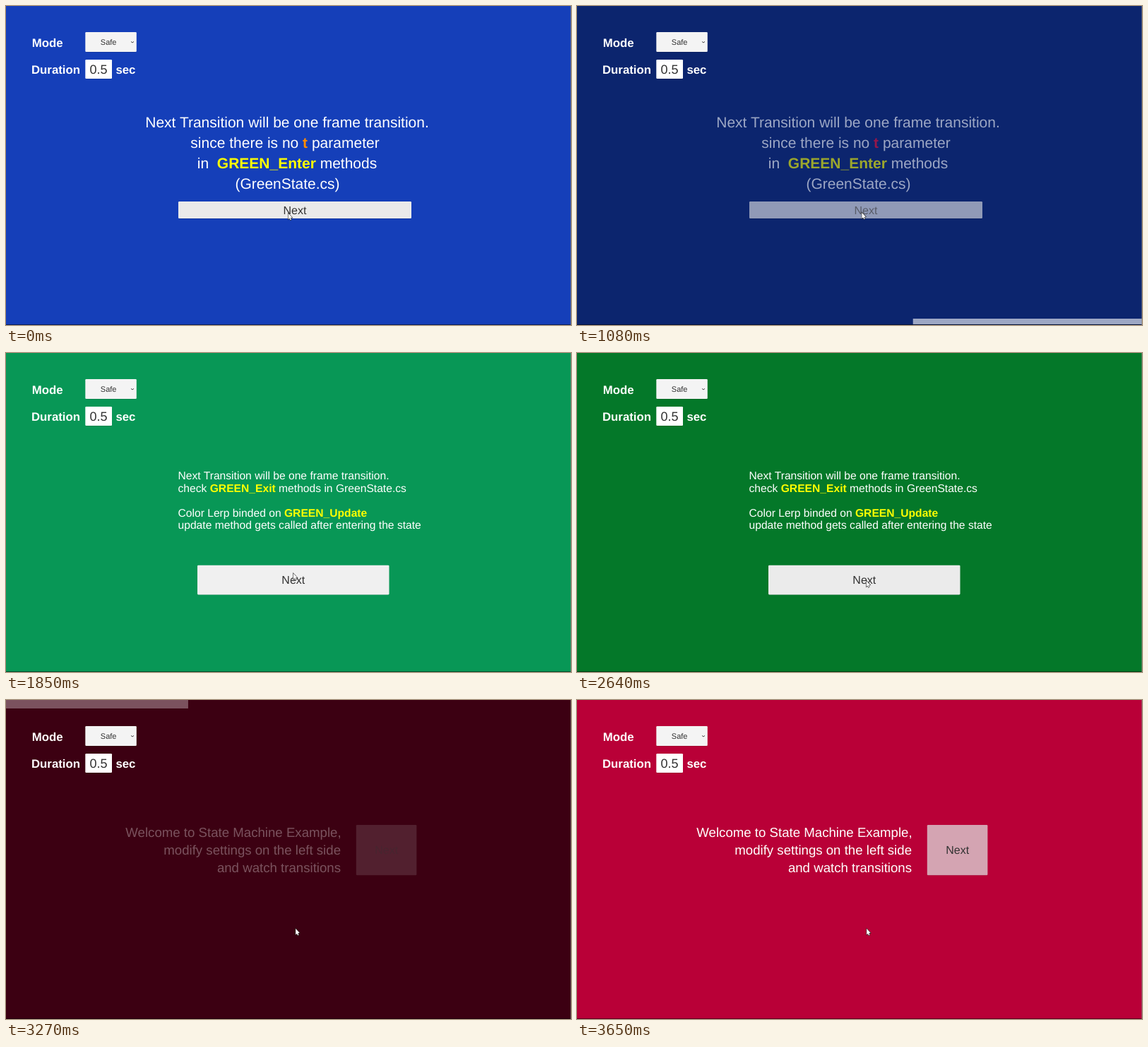
These frames come from a looping animation (800x452 px, 3.73 s). An HTML page with a canvas:

```html
<!DOCTYPE html>
<html lang="en">
<head>
<meta charset="utf-8">
<title>State machine transitions</title>
<style>
html, body { margin: 0; width: 100%; height: 100%; overflow: hidden; background: #000; }
canvas { display: block; width: 800px; height: 452px; }
</style>
</head>
<body>
<canvas id="stage" width="800" height="452"></canvas>
<script>
const W = 800, H = 452, LOOP = 3730;
const ctx = document.getElementById('stage').getContext('2d');
ctx.textRendering = 'geometricPrecision';

const FONT = '"Liberation Sans", Arial, sans-serif';
const INK = '#323232', WHITE = '#fff', YELLOW = '#ff0';

// Picture updates come in evenly spaced runs: [first, last, count].
const RUNS = [
  [380, 530, 3], [770, 1230, 7], [1310, 1770, 7], [1850, 2320, 7],
  [2400, 2870, 7], [2940, 3430, 7], [3480, 3650, 3]
];
const TICKS = [0];
for (const [first, last, count] of RUNS) {
  for (let i = 0; i < count; i++) {
    TICKS.push(Math.round((first + (last - first) * i / (count - 1)) / 10) * 10);
  }
}

const BLUE_EXIT = 883, BLUE_FADE = 486;
const GREEN_START = BLUE_EXIT + BLUE_FADE;
const RED_START = 3112, RED_FADE = 490;

const clamp = v => Math.max(0, Math.min(1, v));
const mix = (a, b, k) => a + (b - a) * k;
const ramp = (t, start, length) => clamp((t - start) / length);
const rgb = c => `rgb(${c.map(Math.round).join(',')})`;
const gray = v => rgb([v, v, v]);

// Piecewise linear value from rows of [time, ...values].
function along(rows, t) {
  if (t <= rows[0][0]) return rows[0].slice(1);
  for (let i = 1; i < rows.length; i++) {
    const a = rows[i - 1], b = rows[i];
    if (t < b[0]) {
      const k = (t - a[0]) / (b[0] - a[0]);
      return a.slice(1).map((v, j) => mix(v, b[j + 1], k));
    }
  }
  return rows[rows.length - 1].slice(1);
}

const CURSOR_PATH = [
  [300, 399.3, 293.5], [530, 403, 292.3], [1390, 403, 292.3],
  [1850, 406.5, 312], [2640, 409.3, 322.3], [2870, 409.8, 323.7]
];
const ACCENT = [[0, 255, 140, 0], [0.4, 243, 10, 51], [0.88, 255, 255, 0]];

function fillBox(x, y, w, h, color, radius = 0) {
  ctx.fillStyle = color;
  ctx.beginPath();
  ctx.roundRect(x, y, w, h, radius);
  ctx.fill();
}

// A light control with a faint edge below it.
function panel(x, y, w, h, color) {
  fillBox(x + 1, y + h, w - 2, 0.6, 'rgba(0,0,0,0.25)');
  fillBox(x, y, w, h, color, 1.3);
}

function text(str, x, y, size, color = WHITE, align = 'left', weight = 'normal') {
  ctx.font = `${weight} ${size}px ${FONT}`;
  ctx.textAlign = align;
  ctx.fillStyle = color;
  ctx.fillText(str, x, y);
}

// A line of spans: plain strings, or [string, color] for bold colored words.
function richLine(spans, x, y, size, centered) {
  const parts = spans.map(s => {
    const [str, color, weight] = Array.isArray(s) ? [...s, 'bold'] : [s, WHITE, 'normal'];
    ctx.font = `${weight} ${size}px ${FONT}`;
    return { str, color, weight, width: ctx.measureText(str).width };
  });
  if (centered) x -= parts.reduce((sum, p) => sum + p.width, 0) / 2;
  for (const p of parts) {
    text(p.str, x, y, size, p.color, 'left', p.weight);
    x += p.width;
  }
}

function button(x, y, w, h, tone, labelX, labelY, opacity = 1) {
  const alpha = ctx.globalAlpha;
  ctx.globalAlpha = alpha * opacity;
  panel(x, y, w, h, gray(tone));
  ctx.globalAlpha = alpha;
  text('Next', labelX, labelY, 16, INK, 'center');
}

function pressed(tone, t, down, up) {
  return mix(tone, 200, ramp(t, down - 50, 100) * (1 - ramp(t, up, 100)));
}

function background(color) {
  fillBox(0, 0, W, H, rgb(color));
}

function blueState(t) {
  const p = ramp(t, BLUE_EXIT, BLUE_FADE);
  background([21, 63, 185].map(v => v * (1 - p)));
  ctx.globalAlpha = 1 - p;
  const accent = rgb(along(ACCENT, p));
  richLine(['Next Transition will be one frame transition.'], 398, 172, 21, true);
  richLine(['since there is no ', ['t', accent], ' parameter'], 395, 201, 21, true);
  richLine(['in  ', ['GREEN_Enter', YELLOW], ' methods'], 398, 230, 21, true);
  richLine(['(GreenState.cs)'], 398.5, 259, 21, true);
  button(244, 277, 330, 24, pressed(234, t, 770, BLUE_EXIT), 409, 294.8);
  if (p > 0) fillBox(W * (1 - p), 443, W * p, 8, WHITE);
  ctx.globalAlpha = 1;
}

function greenState(t) {
  const k = (t - 1850) / 790;
  background([mix(8, 4, k), mix(151, 120, k), mix(86, 41, k)]);
  const x = 243.5, size = 15.65;
  richLine(['Next Transition will be one frame transition.'], x, 179, size);
  richLine(['check ', ['GREEN_Exit', YELLOW], ' methods in GreenState.cs'], x, 196.5, size);
  richLine(['Color Lerp binded on ', ['GREEN_Update', YELLOW]], x, 231.8, size);
  richLine(['update method gets called after entering the state'], x, 249.3, size);
  const tone = mix(245, 235, ramp(t, 1800, 100));
  button(271, 300.7, 271.5, 41.7, pressed(tone, t, 2940, RED_START), 406.8, 327.3);
}

function redState(t) {
  const p = ramp(t, RED_START, RED_FADE);
  const enabled = ramp(t, RED_START + RED_FADE, 100);
  background([185 * p, 0, 55 * p]);
  ctx.globalAlpha = p;
  text('Welcome to State Machine Example,', 474.6, 193.8, 18.65, WHITE, 'right');
  text('modify settings on the left side', 474, 219, 18.65, WHITE, 'right');
  text('and watch transitions', 474, 244.2, 18.65, WHITE, 'right');
  button(495.8, 177, 85.6, 71.2, mix(200, 245, enabled), 538.7, 218, mix(0.5, 1, enabled));
  if (p < 1) fillBox(0, 0, W * p, 12, WHITE);
  ctx.globalAlpha = 1;
}

function settings() {
  text('Mode', 36.8, 57.6, 16.8, WHITE, 'left', 'bold');
  text('Duration', 36, 95.8, 16.8, WHITE, 'left', 'bold');
  text('sec', 155.4, 95.8, 16.8, WHITE, 'left', 'bold');
  panel(112.3, 37, 72.5, 28, '#f4f4f4');
  text('Safe', 133.8, 55.2, 11, INK);
  ctx.strokeStyle = INK;
  ctx.lineWidth = 0.9;
  ctx.beginPath();
  ctx.moveTo(177, 50.4);
  ctx.lineTo(179, 52);
  ctx.lineTo(181, 50.4);
  ctx.stroke();
  panel(112.3, 76, 37.7, 27, WHITE);
  text('0.5', 118.4, 95.9, 18, INK);
}

function cursor(t) {
  const [x, y] = along(CURSOR_PATH, t);
  ctx.save();
  ctx.translate(x, y);
  ctx.scale(0.92, 0.92);
  ctx.beginPath();
  ctx.moveTo(0.4, 0.4);
  ctx.lineTo(0.4, 9.6);
  ctx.lineTo(2.4, 7.8);
  ctx.lineTo(3.6, 10.6);
  ctx.lineTo(5, 10);
  ctx.lineTo(3.9, 7.2);
  ctx.lineTo(6.4, 6.9);
  ctx.closePath();
  ctx.strokeStyle = '#222';
  ctx.lineWidth = 1.2;
  ctx.stroke();
  ctx.fillStyle = WHITE;
  ctx.fill();
  ctx.restore();
}

function draw(t) {
  if (t < GREEN_START) blueState(t);
  else if (t < RED_START) greenState(t);
  else redState(t);
  settings();
  fillBox(0, 451, W, 1, 'rgba(0,0,0,0.5)');
  fillBox(799, 0, 1, H, 'rgba(128,128,128,0.5)');
  cursor(t);
}

let origin = null;
function loop(now) {
  if (origin === null) origin = now;
  const time = (now - origin) % LOOP;
  draw(TICKS.findLast(tick => tick <= time) ?? 0);
  requestAnimationFrame(loop);
}
requestAnimationFrame(loop);
</script>
</body>
</html>
```
